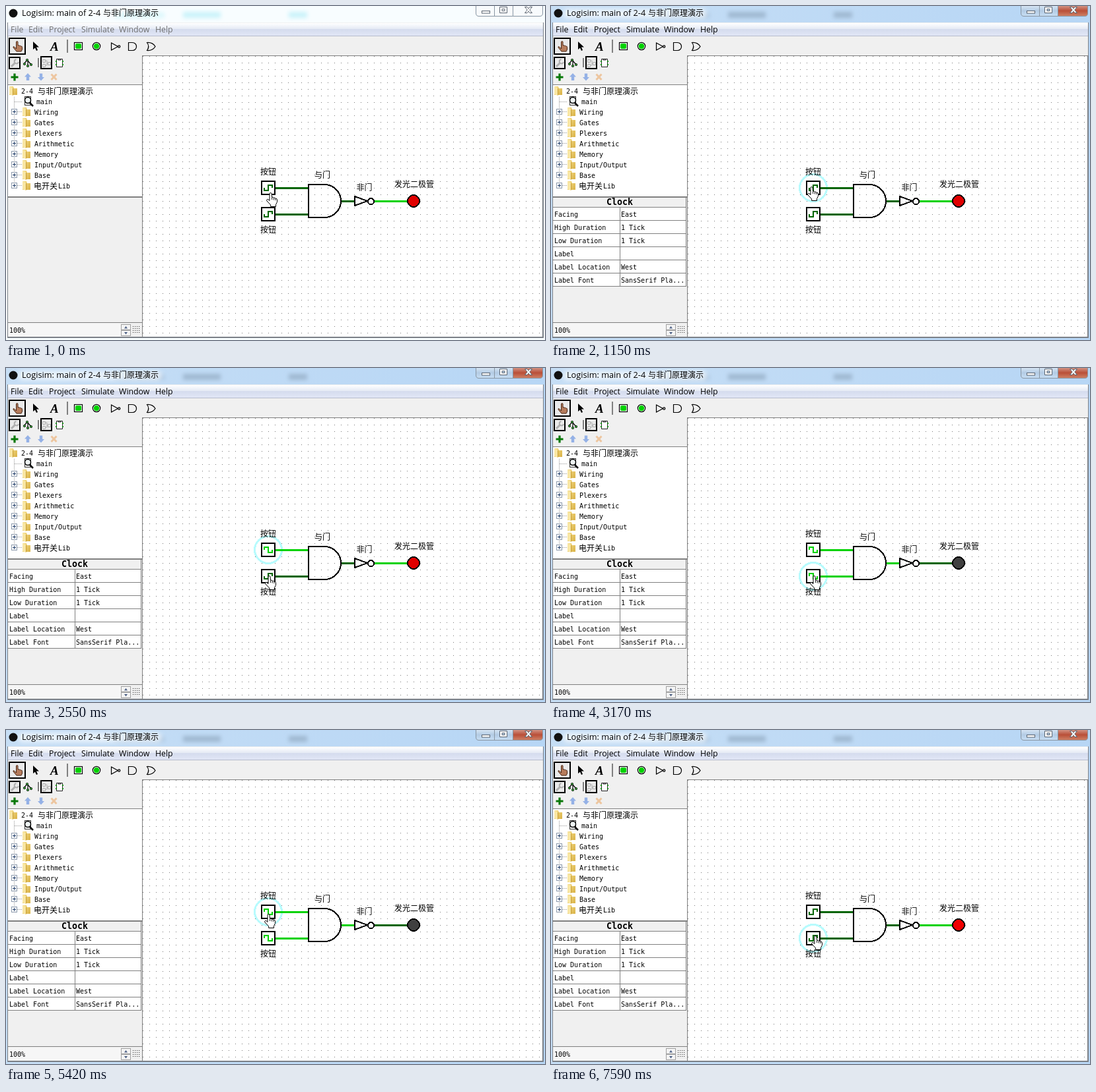
These frames come from a looping animation (816 px wide and 507 px high, 8980 ms). An HTML page:

```html
<!DOCTYPE html>
<html lang="zh">
<head>
<meta charset="utf-8">
<title>NAND demo</title>
<style>
html, body { margin: 0; width: 100%; height: 100%; overflow: hidden; background: #fff; }
svg { display: block; }
text { white-space: pre; }
.ui { font-family: "Open Sans", sans-serif; font-size: 12.3px; }
.mono { font-family: "DejaVu Sans Mono", monospace; font-size: 10px; }
.han { font-family: "Noto Sans CJK SC", "Noto Sans CJK", sans-serif; font-size: 12px; }
.crisp { shape-rendering: crispEdges; }
.line { fill: none; stroke: #000; stroke-width: 2; }
.thin { fill: none; stroke: #000; stroke-width: 1.2; }
.rule { fill: none; stroke: #808080; }
</style>
</head>
<body>
<svg id="stage" width="816" height="507" viewBox="0 0 816 507">
<defs>
  <linearGradient id="menuBg" x2="0" y2="1"><stop stop-color="#fff"/><stop offset=".45" stop-color="#e5eaf5"/><stop offset=".45" stop-color="#d4dbed"/><stop offset="1" stop-color="#e1e6f6"/></linearGradient>
  <linearGradient id="glass"><stop stop-color="#c6def5"/><stop offset="1" stop-color="#b7d6f5"/></linearGradient>
  <linearGradient id="pane" x2="0" y2="1"><stop stop-color="#d9e7f5"/><stop offset=".5" stop-color="#b3cbe4"/><stop offset="1" stop-color="#c8dff4"/></linearGradient>
  <linearGradient id="closeBg" x2="0" y2="1"><stop stop-color="#d59a8c"/><stop offset=".5" stop-color="#b94f38"/><stop offset="1" stop-color="#cf8266"/></linearGradient>
  <linearGradient id="gold" x2="1" y2="1"><stop stop-color="#f5dc87"/><stop offset="1" stop-color="#d9b247"/></linearGradient>
  <filter id="soft" x="-50%" y="-100%" width="200%" height="300%"><feGaussianBlur stdDeviation="3"/></filter>
  <pattern id="dots" x="207" y="76" width="10" height="10" patternUnits="userSpaceOnUse"><rect width="1" height="1" fill="#777"/></pattern>
  <pattern id="grip" x="192" y="486" width="3" height="3" patternUnits="userSpaceOnUse"><rect width="1" height="1" fill="#222"/></pattern>
  <g id="folder">
    <path d="M1 1H7L8 4H13V14H1Z" fill="url(#gold)"/>
    <path d="M1 1 6 3V15L1 13Z" fill="#f8e6a4"/>
    <path d="M6.500 4V14.500" stroke="#c79d35"/>
  </g>
  <path id="pokeHand" d="M5.500 12V2Q5.500.5 6.700.5 8 .5 8 2V7Q9.500 6 10.500 7.300 12 6.700 12.700 8.200 14.500 7.800 14.500 9.500V13L13 16H6L1 10Q.5 8.500 2 8.500Z"/>
</defs>

<!-- window frame -->
<rect id="frame" width="816" height="507"/>
<g id="smudge" filter="url(#soft)">
  <rect x="268" y="9" width="57" height="9"/>
  <rect x="428" y="9" width="28" height="9"/>
  <rect x="165" y="10" width="75" height="8" opacity=".6"/>
</g>
<rect id="glow" x="18" y="4" width="218" height="15" rx="7" fill="#fff" opacity=".6" filter="url(#soft)"/>
<circle cx="11" cy="11" r="6.500" fill="#111"/>
<text class="ui" x="24" y="15" style="font-size:12.700px">Logisim: main of 2-4</text>
<text class="han" x="147" y="15">与非门原理演示</text>
<g id="winButtons" stroke="#8996a3">
  <path id="paneLeft" d="M711.500-1H767.500V15.500H716Q711.500 15.500 711.500 11Z"/>
  <path id="paneClose" d="M767.500-1H812.500V11Q812.500 15.500 808 15.500H767.500Z"/>
  <path d="M739.500 0V15" fill="none"/>
  <g fill="#fff" stroke="#5b6470">
    <rect x="720.500" y="7.500" width="12" height="3.500"/>
    <path d="M747.500 1.500h11v9h-11ZM751 4.500h4v3h-4Z" fill-rule="evenodd"/>
    <path d="M785.500 1.500h3.500l2 2.500 2-2.500h3.500l-3.700 4.500 3.700 4.500h-3.500l-2-2.500-2 2.500h-3.500l3.700-4.500Z"/>
  </g>
</g>
<rect x="2" y="25" width="812" height="479" fill="#f0f0f0"/>
<rect x="2" y="26" width="812" height="19" fill="url(#menuBg)"/>
<path class="crisp" d="M3 45.500H813" stroke="#b6bccc"/>
<g id="menu" class="ui"></g>

<!-- main toolbar -->
<rect class="line crisp" x="5" y="49" width="24" height="24" style="fill:#eaeaea"/>
<use href="#pokeHand" x="10" y="53" fill="#b67c5c" stroke="#4a2817"/>
<path d="M41 54V66l3-2.500 2 4.500 2-1-2-4.500h4Z"/>
<text x="67" y="68" font-family="Liberation Serif, serif" font-size="19" font-weight="bold" font-style="italic">A</text>
<path class="crisp" d="M93 51V71" stroke="#808080" stroke-width="2"/>
<rect class="thin" x="103.500" y="55.500" width="12" height="11" style="fill:#fff"/><rect x="105" y="57" width="9" height="8" rx="2" fill="#00d200"/>
<circle class="thin" cx="137" cy="61" r="5.700" style="fill:#fff"/><circle cx="137" cy="61" r="4.300" fill="#00d200"/>
<path class="thin" d="M159.500 56V67L169.500 61.500Z"/><circle class="thin" cx="171.200" cy="61.500" r="1.600"/>
<path class="thin" d="M185.500 55.500h6a6 6 0 0 1 0 12h-6Z"/>
<path class="thin" d="M213.500 55.500Q222 55 226 61.500 222 68 213.500 67.500 218 61.500 213.500 55.500Z"/>

<!-- explorer toolbars -->
<g class="line crisp"><rect x="5" y="78" width="16" height="17" style="fill:#eaeaea"/><rect x="53" y="77" width="16" height="18" style="fill:#eaeaea"/></g>
<path d="M8 92 14 86" fill="none" stroke="#b0b0b0" stroke-width="3"/>
<path d="M15.500 81a3.200 3.200 0 1 0 3.500 4" fill="none" stroke="#b0b0b0" stroke-width="2"/>
<path class="thin" d="M27 88 32 82 39 90M33 83V90"/>
<g stroke="#000" stroke-width=".7" fill="#36a336"><circle cx="28" cy="88" r="1.700"/><circle cx="33" cy="91" r="1.700"/><circle cx="38" cy="89" r="1.700"/><circle cx="32" cy="82" r="1.700"/></g>
<path class="rule crisp" d="M49 79V93" stroke-width="2"/>
<path d="M55.500 81.500h4v4h-4ZM55.500 88.500h4v4h-4ZM63.500 85.500h4v4h-4ZM60 83h2v4h2M60 90h2v-3" fill="none" stroke="#b0b0b0"/>
<path d="M76.500 80.500h9v12h-9ZM79 80v2h4v-2" fill="#fff" stroke="#222"/><path d="M75 84h2M75 89h2M85 84h2M85 89h2" stroke="#149014" stroke-width="2"/>
<path d="M13 102.500V113.500M7.500 108H18.500" stroke="#087808" stroke-width="3.200"/>
<path d="M33 102 38 107.500H35.200V113H30.800V107.500H28ZM53 113.500 58 108H55.200V102.500H50.800V108H48Z" fill="#94b1e6"/>
<path d="M68.500 103.500 76.500 112M76.500 103.500 68.500 112" stroke="#edc6a0" stroke-width="3"/>

<!-- library tree -->
<rect x="3" y="120" width="203" height="169" fill="#fff"/>
<path class="rule crisp" d="M3 119.500H206"/>
<path d="M12.500 138V273M13 145.500H24" fill="none" stroke="#999" stroke-dasharray="1 1" class="crisp"/>
<use href="#folder" x="4" y="121"/>
<text class="mono" x="23" y="133">2-4</text><text class="han" x="48" y="133.500">与非门原理演示</text>
<rect x="28.500" y="137.500" width="9" height="13" fill="#fff" stroke="#333"/>
<circle cx="33" cy="143" r="4.500" fill="#eef4f4" stroke="#000" stroke-width="1.500"/><path d="M36 147 41 152" stroke="#000" stroke-width="2.500"/>
<text class="mono" x="46" y="149">main</text>
<g id="tree"></g>

<!-- attributes -->
<g id="attrs"></g>
<path class="rule crisp" d="M3 290H206" stroke-width="2"/>
<path class="rule crisp" d="M3 480.500H206"/>
<rect x="4" y="482" width="170" height="20" fill="#f6f6f6"/>
<text class="mono" x="5" y="496">100%</text>
<g fill="#f4f4f4" stroke="#a0a0a0"><rect x="174.500" y="483.500" width="14" height="8"/><rect x="174.500" y="492.500" width="14" height="8"/></g>
<path d="M179 489.500 181.500 486 184 489.500ZM179 495 181.500 498.500 184 495Z" fill="#4d6185"/>
<rect class="crisp" x="192" y="486" width="12" height="12" fill="url(#grip)"/>

<!-- canvas -->
<rect x="207" y="76" width="606" height="427" fill="#fff"/>
<rect class="crisp" x="207" y="76" width="606" height="427" fill="url(#dots)"/>
<path class="rule crisp" d="M206.500 503V75.500H813"/>
<path class="crisp" d="M2.500 25V503H813V25" fill="none" stroke="#7b8087"/>
<path class="crisp" d="M3 503H813V76" fill="none" stroke="#7b8087" stroke-width="2"/>
<circle id="halo" class="crisp" cx="397" r="20.500" fill="none" stroke="#b8fbfd" stroke-width="3"/>
<g class="crisp" fill="none" stroke-width="3">
  <path id="wireA" d="M407 276.500H458"/>
  <path id="wireB" d="M407 316.500H458"/>
  <path id="wireAnd" d="M506 296.500H528"/>
  <path id="wireNot" d="M556 296.500H609"/>
</g>
<g class="line crisp">
  <rect x="387" y="266" width="20" height="20"/>
  <rect x="387" y="306" width="20" height="20"/>
  <path id="pulseA"/>
  <path id="pulseB"/>
  <path d="M458 271H482A25 25 0 0 1 482 321H458Z"/>
  <path d="M528 289V303L547 296Z"/>
  <circle cx="552.500" cy="296.500" r="4.500"/>
</g>
<circle id="led" class="crisp" cx="617" cy="296" r="9" stroke="#000" stroke-width="2"/>
<g id="labels" class="han"></g>

<g id="cursor">
  <path d="M5 12.500V2.200Q5 .5 6.500.5T8.100 2.200L8.600 7.300Q10.800 6.600 11.300 8.200 13.300 7.500 13.900 9.200 16.500 8.900 16.500 11.200V14.500L14.500 18.500V21.500H6.700V19L1 13Q-.2 11 1.600 10.400 3 10.200 5 12.500Z" fill="#fff" stroke="#000"/>
  <path d="M8.600 7.500V11M11.300 8.500V11.500M13.900 9.500V12" stroke="#000" stroke-width=".9"/>
</g>
</svg>

<script>
const LOOP = 8980;
const ON = "#00d200", OFF = "#006400";
const $ = id => document.getElementById(id);
const set = (id, attrs) => { for (const k in attrs) $(id).setAttribute(k, attrs[k]); };
const text = (cls, x, y, s) => `<text class="${cls}" x="${x}" y="${y}">${s}</text>`;

$("menu").innerHTML = [["File", 7], ["Edit", 34], ["Project", 65], ["Simulate", 114], ["Window", 171], ["Help", 226]]
  .map(([s, x]) => text("ui", x, 40, s)).join("");

$("tree").innerHTML = ["Wiring", "Gates", "Plexers", "Arithmetic", "Memory", "Input/Output", "Base", "Lib"]
  .map((s, i) => {
    const y = 161 + 16 * i, last = s === "Lib";
    return `<path class="crisp" d="M17 ${y - .5}H24" stroke="#999" stroke-dasharray="1 1"/>
      <rect x="8.500" y="${y - 4.5}" width="8" height="8" fill="#fff" stroke="#8d9aac"/>
      <path class="crisp" d="M10 ${y - .5}H15M12.500 ${y - 3}V${y + 2}" stroke="#24406c"/>
      <use href="#folder" x="24" y="${y - 8}"/>` +
      (last ? text("han", 42, y + 4.5, "电开关") : "") + text("mono", last ? 79 : 43, y + 4, s);
  }).join("");

const rows = [["Facing", "East"], ["High Duration", "1 Tick"], ["Low Duration", "1 Tick"],
  ["Label", ""], ["Label Location", "West"], ["Label Font", "SansSerif Pla..."]];
$("attrs").innerHTML =
  `<text class="mono" x="84" y="302" style="font-size:13.300px;font-weight:bold">Clock</text>
  <rect x="4" y="306" width="200" height="120" fill="#fff"/>
  <path class="rule crisp" d="M104.500 306V426M204.500 290V426M3 305.500H205"/>` +
  rows.map(([k, v], i) => {
    const y = 306 + 20 * i;
    return text("mono", 5, y + 14, k) + text("mono", 106, y + 14, v) +
      `<path class="rule crisp" d="M3 ${y + 19.5}H205"/>`;
  }).join("");

$("labels").innerHTML = [["按钮", 385, 256], ["与门", 467, 260.5], ["非门", 530.5, 279.5], ["发光二极管", 588, 275], ["按钮", 385, 344]]
  .map(([s, x, y]) => text("han", x, y, s)).join("");

// Pointer moves: first step, last step, step count, end x, end y
const moves = [
  [60, 290, 4, 388, 274], [1910, 2550, 9, 392, 315],
  [4650, 4650, 1, 391, 302], [4730, 4870, 3, 391, 283], [5020, 5100, 2, 391, 279],
  [6260, 6260, 1, 391, 289], [6340, 6410, 2, 394, 305], [6640, 6810, 3, 394, 312]
];

function pointer(t) {
  let x = 394, y = 283;
  for (const [t0, t1, n, ex, ey] of moves) {
    if (t < t0) break;
    const gap = n > 1 ? (t1 - t0) / (n - 1) : 1;
    const p = Math.min(n, Math.floor((t - t0) / gap + 1e-6) + 1) / n;
    x += (ex - x) * p;
    y += (ey - y) * p;
  }
  return [Math.round(x), Math.round(y)];
}

function clock(name, cy, on) {
  const d = on ? -4 : 4, stroke = on ? ON : OFF;
  set("pulse" + name, { d: `M391 ${cy}v${d}h6v${-2 * d}h6v${d}`, style: "stroke:" + stroke });
  set("wire" + name, { stroke });
}

function chrome(active) {
  set("frame", { fill: active ? "url(#glass)" : "#f8fdff" });
  set("smudge", { fill: active ? "#9fb8d0" : "#c9f3fa" });
  set("glow", { visibility: active ? "visible" : "hidden" });
  set("paneLeft", { fill: active ? "url(#pane)" : "#f8fbfd" });
  set("paneClose", { fill: active ? "url(#closeBg)" : "#f8fbfd" });
  set("menu", { fill: active ? "#000" : "#707070" });
  set("attrs", { visibility: active ? "visible" : "hidden" });
}

function draw(t) {
  const a = t >= 1300 && t < 5570;
  const b = t >= 3170 && t < 7590;
  const both = a && b;
  const active = t >= 1150;
  const upper = t < 3020 || (t >= 5420 && t < 7420);
  chrome(active);
  clock("A", 276, a);
  clock("B", 316, b);
  set("wireAnd", { stroke: both ? ON : OFF });
  set("wireNot", { stroke: both ? OFF : ON });
  set("led", { fill: both ? "#404040" : t < 3170 ? "#e00000" : "#f00000" });
  set("halo", { cy: upper ? 276 : 316, visibility: active ? "visible" : "hidden" });
  set("cursor", { transform: `translate(${pointer(t)})` });
}

const start = performance.now();
function tick() {
  draw((performance.now() - start) % LOOP);
  requestAnimationFrame(tick);
}
tick();
</script>
</body>
</html>
```
